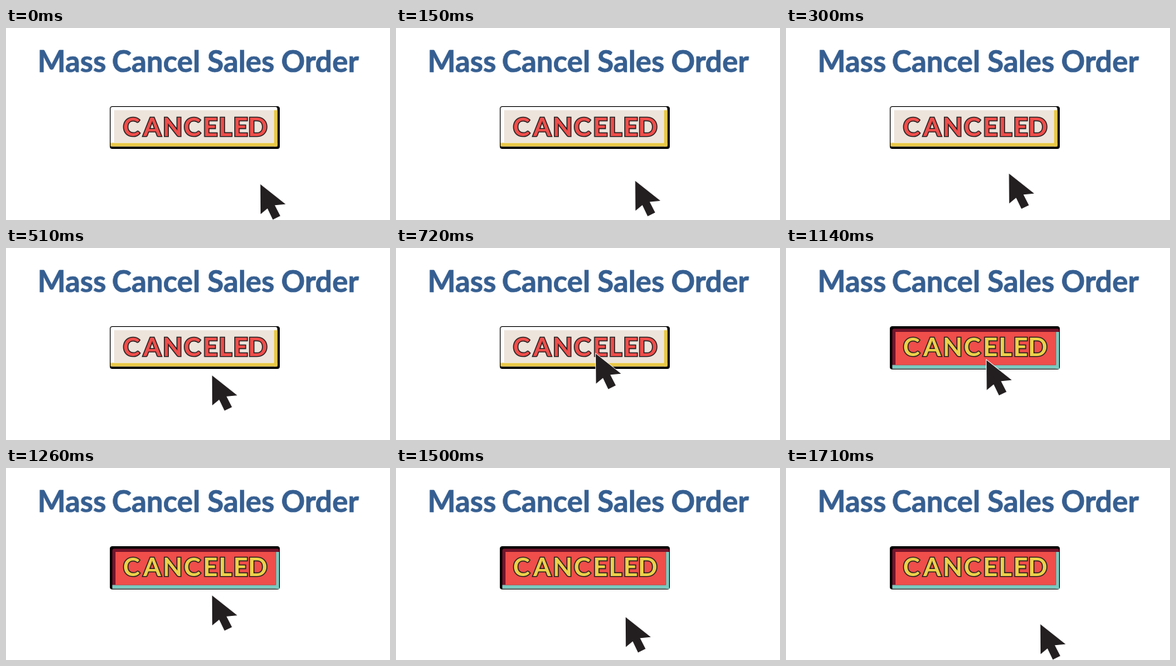
These frames come from a looping animation (540 px wide and 270 px high, 1800 ms). An HTML page with a canvas:

```html
<!DOCTYPE html>
<html lang="en">
<head>
<meta charset="utf-8">
<title>Mass Cancel Sales Order</title>
<style>
  html, body { margin: 0; width: 100%; height: 100%; overflow: hidden; background: #fff; }
  canvas { display: block; width: 540px; height: 270px; }
</style>
</head>
<body>
<canvas id="stage"></canvas>
<script>
const W = 540, H = 270, LOOP = 1800, STEP = 30;
const canvas = document.getElementById('stage');
const ctx = canvas.getContext('2d');
const dpr = window.devicePixelRatio || 1;
canvas.width = W * dpr;
canvas.height = H * dpr;

const INK = '#231f20', BLUE = '#365f91';
const TITLE = [['Mass', 47.5], ['Cancel', 150], ['Sales', 283.2], ['Order', 388]];
const LABEL = [['C', 177], ['A', 205.5], ['N', 234], ['C', 262.5],
               ['E', 288], ['L', 309.5], ['E', 330.5], ['D', 354.7]];
const ARROW = [[0, 0], [0.3, 42], [10, 34], [17.5, 49.7], [28, 44.5], [20.3, 29.5], [35.4, 28]];

// Cursor route from its resting place to the button, ending with a short lift
const LIFT = 3.2;
const route = document.createElementNS('http://www.w3.org/2000/svg', 'path');
route.setAttribute('d', `M357.7 219.7 Q290 210 281 152 v${-LIFT}`);
const full = route.getTotalLength();
const pressed = full - LIFT;

const progress = (t, from, to) => Math.min(1, Math.max(0, (t - from) / (to - from)));

function box(x1, y1, x2, y2, fill, r = 0) {
  ctx.beginPath();
  ctx.roundRect(x1, y1, x2 - x1, y2 - y1, r);
  ctx.fillStyle = fill;
  ctx.fill();
}

function title() {
  ctx.font = '700 41.5px Lato, Carlito, sans-serif';
  ctx.lineWidth = 0.7;
  ctx.strokeStyle = ctx.fillStyle = BLUE;
  for (const [word, left] of TITLE) {
    const x = left + ctx.measureText(word).actualBoundingBoxLeft;
    ctx.fillText(word, x, 62);
    ctx.strokeText(word, x, 62);
  }
}

function label(fill) {
  ctx.font = '700 36px Lato, sans-serif';
  ctx.miterLimit = 3;
  ctx.lineWidth = 2.7;
  ctx.strokeStyle = INK;
  ctx.fillStyle = fill;
  for (const [letter, center] of LABEL) {
    const m = ctx.measureText(letter);
    const x = center + (m.actualBoundingBoxLeft - m.actualBoundingBoxRight) / 2;
    ctx.strokeText(letter, x, 151.7);
    ctx.fillText(letter, x, 151.7);
  }
}

function raisedButton() {
  box(146, 110, 385, 170, '#000', 3.5);
  box(147, 111, 381.5, 166.5, '#fff', 2.5);
  box(377, 115.5, 381.5, 166.5, '#e9c846');
  box(147, 161.5, 381.5, 166.5, '#e9c846');
  box(152, 115.5, 377, 161.5, '#ede4db');
  label('#ef4e4b');
}

function pressedButton() {
  box(146, 110, 385, 170.7, '#000', 3.5);
  box(149.5, 113.5, 384, 169.7, '#75142a', 2.5);
  box(379.5, 118, 384, 169.7, '#7bcabf');
  box(149.5, 164.5, 384, 169.7, '#7bcabf');
  box(154, 118, 379.5, 164.5, '#ef4e4a');
  label('#ecd04a');
}

function cursorDistance(t) {
  if (t < 720) return full * progress(t, 20, 700);
  if (t < 1110) return full - LIFT * progress(t, 720, 900);
  return pressed * (1 - progress(t, 1110, 1690));
}

function cursor(t) {
  const p = route.getPointAtLength(cursorDistance(t));
  ctx.beginPath();
  ARROW.forEach(([x, y]) => ctx.lineTo(p.x + x, p.y + y));
  ctx.closePath();
  ctx.lineWidth = 1.6;
  ctx.strokeStyle = '#fff';
  ctx.stroke();
  ctx.fillStyle = INK;
  ctx.fill();
}

function draw(t) {
  ctx.setTransform(dpr, 0, 0, dpr, 0, 0);
  ctx.fillStyle = '#fff';
  ctx.fillRect(0, 0, W, H);
  title();
  if (t < LOOP / 2) raisedButton();
  else pressedButton();
  cursor(t);
}

const start = performance.now();
function tick() {
  const t = (performance.now() - start) % LOOP;
  draw(Math.floor(t / STEP) * STEP);
  requestAnimationFrame(tick);
}
tick();
</script>
</body>
</html>
```
